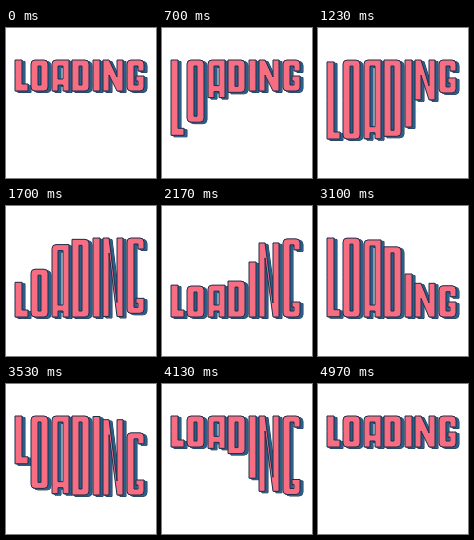
Recreate the animation shown at these times as an HTML page with a canvas. Size 150 by 150 pixels, loop 5030 ms.

```html
<!DOCTYPE html>
<html lang="en">
<head>
<meta charset="utf-8">
<title>Loading</title>
<style>
html, body { margin: 0; width: 100%; height: 100%; overflow: hidden; background: #fff; }
canvas { display: block; }
</style>
</head>
<body>
<canvas id="stage" width="150" height="150" role="img" aria-label="LOADING"></canvas>
<script>
const ctx = document.getElementById('stage').getContext('2d');
const LOOP = 5030, FRAME = 100 / 3, LAST = 149;
const STAGGER = 5, STEP = 30, TRAVEL = 48, MIDDLE = 48;
const PINK = '#f76e83', BLUE = '#2c5f88', NAVY = '#1b2f4b';

// Outlines at rest: "x,y" corners, "r" marks a rounded one, "/" starts a hole.
const LETTERS = [
  '9,32 16,32 16,56 22,56 22,63 9,63',
  '25,32r 42,32r 42,63r 25,63r / 32,38 35,38 35,57 32,57',
  '46,32r 63,32 63,63 57,63 57,57 52,57 52,63 46,63 / 52,38 57,38 57,51 52,51',
  '66,32 83,32r 83,63r 66,63 / 73,38 76,38 76,57 73,57',
  '87,32 94,32 94,63 87,63',
  '97,32 103,32 111,49 111,32 117,32 117,63 111,63 103,47 103,63 97,63',
  '121,32r 138,32r 138,43 132,43 132,38 128,38 128,57 132,57 132,53 130,53 130,48 138,48 138,63r 121,63r'
].map(text => text.split(' / ').map(ring => ring.split(' ').map(p => {
  const [x, y] = p.split(',').map(parseFloat);
  return { x, y, r: p.endsWith('r') ? 4 : 0 };
})));

// cubic-bezier(.8, 0, .2, 1)
function ease(x) {
  if (x <= 0) return 0;
  if (x >= 1) return 1;
  let lo = 0, hi = 1;
  for (let i = 0; i < 20; i++) {
    const t = (lo + hi) / 2, u = 1 - t;
    if (2.4 * u * u * t + 0.6 * u * t * t + t * t * t < x) lo = t; else hi = t;
  }
  return lo * lo * (3 - 2 * lo);
}

function outline(rings, top, bottom) {
  const path = new Path2D();
  for (const ring of rings) {
    const pts = ring.map(p => ({ ...p, y: p.y + (p.y < MIDDLE ? top : bottom) }));
    const end = pts[pts.length - 1];
    path.moveTo((end.x + pts[0].x) / 2, (end.y + pts[0].y) / 2);
    pts.forEach((p, i) => {
      const next = pts[(i + 1) % pts.length];
      if (p.r) path.arcTo(p.x, p.y, next.x, next.y, p.r);
      else path.lineTo(p.x, p.y);
    });
    path.closePath();
  }
  return path;
}

function drawLetter(path) {
  ctx.strokeStyle = NAVY;
  for (let d = 3; d >= 0; d -= 0.5) {
    ctx.save();
    ctx.translate(d, d / 2);
    ctx.fillStyle = d ? BLUE : PINK;
    if (d === 3) ctx.stroke(path);
    ctx.fill(path, 'evenodd');
    if (!d) ctx.stroke(path);
    ctx.restore();
  }
}

function draw(now) {
  const frame = Math.min(LAST, Math.floor((now % LOOP + 4) / FRAME));
  ctx.fillStyle = '#fff';
  ctx.fillRect(0, 0, 150, 150);
  LETTERS.forEach((rings, i) => {
    // Bottom drops, top drops, top rises, bottom rises.
    const move = n => ease((frame - i * STAGGER) / STEP - n);
    const top = TRAVEL * (move(1) - move(2));
    const bottom = TRAVEL * (move(0) - move(3));
    drawLetter(outline(rings, top, bottom));
  });
}

const start = performance.now();
function tick() {
  draw(performance.now() - start);
  requestAnimationFrame(tick);
}
tick();
</script>
</body>
</html>
```
